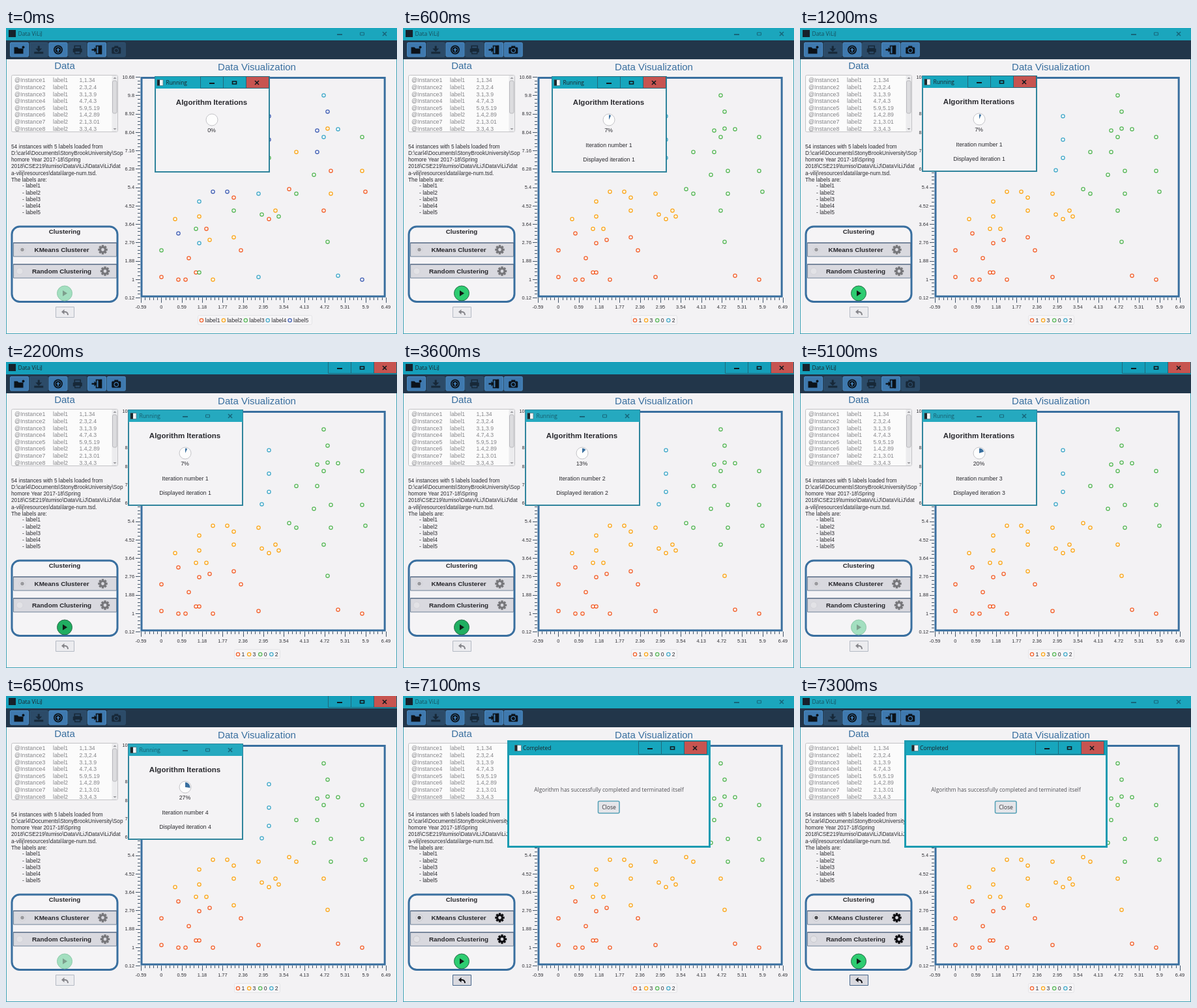
An HTML page with a canvas that plays this animation: 600 by 470 pixels, repeating every 7400 ms.

```html
<!DOCTYPE html>
<html lang="en">
<head>
<meta charset="utf-8">
<title>Data ViLiJ</title>
<style>
html, body { margin: 0; width: 100%; height: 100%; overflow: hidden; background: #f3f2f4; }
canvas { display: block; width: 600px; height: 470px; }
</style>
</head>
<body>
<canvas id="stage" width="600" height="470"></canvas>
<script>
const ctx = document.getElementById('stage').getContext('2d');
const LOOP = 7400, STEP = 100;
const ARIAL = '"Liberation Sans", Arial, sans-serif';
const UI = '"Open Sans", "Noto Sans", sans-serif';
const BLUE = '#396f9f', INK = '#1c2228', BODY = '#f3f2f4';
const COLORS = ['#f3622d', '#fba71b', '#57b757', '#41a9c9', '#4260b5'];
const CLUSTER_COLOR = { 1: COLORS[0], 3: COLORS[1], 0: COLORS[2], 2: COLORS[3] };

// Points of each label, as x, y pairs
const POINTS = [
  [238,382, 264,386, 275,386, 280,353, 291,375, 307,308, 360,341, 349,260, 403,293, 434,247, 487,280, 498,219, 551,251],
  [259,293, 296,289, 312,325, 317,386, 349,321, 413,280, 445,190, 493,154, 498,254, 546,219],
  [238,341, 291,308, 296,375, 349,280, 392,286, 418,289, 472,225, 445,254, 493,328, 546,167, 403,199],
  [296,266, 296,330, 387,254, 387,382, 487,167, 487,103, 509,155, 509,380, 392,218],
  [264,315, 317,251, 339,251, 477,157, 477,190, 493,128, 546,386, 403,135, 403,171]
];

const PERCENT = [0, 7, 13, 20, 27];
const EVENTS = [
  { at: 0, iter: 0, busy: true, focus: 'dialog', hover: false, done: false },
  { at: 600, iter: 1, busy: false },
  { at: 1900, focus: 'main', hover: true },
  { at: 2500, busy: true },
  { at: 3000, iter: 2, busy: false },
  { at: 4000, busy: true },
  { at: 4500, iter: 3, busy: false },
  { at: 4900, busy: true },
  { at: 5500, iter: 4, busy: false },
  { at: 6200, busy: true },
  { at: 7000, busy: false, focus: 'dialog', hover: false, done: true }
];

function stateAt(t) {
  return Object.assign({}, ...EVENTS.filter(e => e.at <= t));
}

function rect(x, y, w, h, fill, stroke, lw = 1, r = 0) {
  ctx.beginPath();
  ctx.roundRect(x, y, w, h, r);
  if (fill) { ctx.fillStyle = fill; ctx.fill(); }
  if (stroke) { ctx.strokeStyle = stroke; ctx.lineWidth = lw; ctx.stroke(); }
}

function circle(x, y, r, fill, stroke, lw = 1) {
  ctx.beginPath();
  ctx.arc(x, y, r, 0, Math.PI * 2);
  if (fill) { ctx.fillStyle = fill; ctx.fill(); }
  if (stroke) { ctx.strokeStyle = stroke; ctx.lineWidth = lw; ctx.stroke(); }
}

function poly(points, fill) {
  ctx.beginPath();
  for (let i = 0; i < points.length; i += 2) ctx.lineTo(points[i], points[i + 1]);
  ctx.fillStyle = fill;
  ctx.fill();
}

function line(x1, y1, x2, y2, color, lw = 1) {
  ctx.beginPath();
  ctx.moveTo(x1, y1);
  ctx.lineTo(x2, y2);
  ctx.strokeStyle = color;
  ctx.lineWidth = lw;
  ctx.stroke();
}

function text(str, x, y, size, color, { align = 'left', weight = 400, family = ARIAL } = {}) {
  ctx.font = `${weight} ${size}px ${family}`;
  ctx.textAlign = align;
  ctx.fillStyle = color;
  ctx.fillText(str, x, y);
}

// Minimise, maximise and close, each 35 wide, starting at x
function windowButtons(x, y, h, active) {
  const mid = y + h / 2;
  const glyph = active ? '#10191e' : '#17667a';
  if (active) {
    rect(x + 70, y, 35, h, '#c75450');
    for (let i = 0; i < 3; i++) rect(x + i * 35 + .5, y - .5, 35, h, null, '#21697b');
  }
  rect(x + 14, mid, 8, 2, glyph);
  rect(x + 49.5, mid - 2, 6, 4, null, glyph, active ? 1.6 : 1);
  line(x + 84, mid - 3, x + 90, mid + 3, glyph, 1.6);
  line(x + 90, mid - 3, x + 84, mid + 3, glyph, 1.6);
}

// Each icon is drawn around the middle of its button
const ICONS = [
  c => {
    poly([-8,-4, -3,-4, -1,-2, 6,-2, 6,6, -8,6], c);
    circle(6, -4, 2, c);
  },
  c => {
    rect(-1.5, -6, 3, 5, c);
    poly([-5,-2, 5,-2, 0,3], c);
    rect(-7, 3, 14, 3, c);
  },
  (c, bg) => {
    circle(0, 0, 7, c);
    circle(0, 0, 4.8, null, bg, .9);
    poly([-3,.5, 0,-3, 3,.5], bg);
    rect(-1, 0, 2, 3, bg);
  },
  (c, bg) => {
    rect(-4.5, -6, 9, 4, null, c, 1.6);
    rect(-7, -2, 14, 6, c, null, 1, 1);
    rect(-4, 2, 8, 4, bg, c, 1.4);
  },
  c => {
    rect(-1, -6, 8, 12, null, c, 1.6);
    poly([2,-6, 7,-7, 7,7, 2,6], c);
    rect(-8, -1.2, 5, 2.4, c);
    poly([-4,-4, 0,0, -4,4], c);
  },
  (c, bg) => {
    rect(-7, -4, 14, 10, c, null, 1, 1.5);
    rect(-3, -6, 6, 3, c);
    circle(0, 1, 3.2, null, bg, 1.2);
  }
];

function toolbar(s) {
  rect(0, 19, 600, 29, '#22364a');
  const enabled = [true, false, true, false, true, !s.busy];
  ICONS.forEach((icon, i) => {
    const cx = 20.5 + i * 29.75;
    const bg = enabled[i] ? '#3f79ae' : '#2c4b68';
    rect(cx - 14, 22.5, 28, 21.5, bg, enabled[i] ? '#4b8cc4' : '#2f5372', 1, 1.5);
    ctx.save();
    ctx.translate(cx, 33.5);
    icon(enabled[i] ? '#0b1219' : '#172838', bg);
    ctx.restore();
  });
}

function dataPanel() {
  text('Data', 90, 62.6, 15, BLUE, { align: 'center' });
  rect(8.5, 72.5, 163, 87, '#fbfbfb', '#c3c3c6', 1, 2);
  const values = ['1,1.34', '2.3,2.4', '3.1,3.9', '4.7,4.3', '5.9,5.19', '1.4,2.89', '2.1,3.01', '3.3,4.3'];
  values.forEach((v, i) => {
    const y = 83.3 + i * 10.62;
    text('@Instance' + (i + 1), 13, y, 8.9, '#858589');
    text(i < 5 ? 'label1' : 'label2', 72, y, 8.7, '#858589');
    text(v, 112.5, y, 8.7, '#858589');
  });
  rect(162.5, 73, 8.5, 86, '#ececee');
  rect(163.5, 81, 6.5, 50, '#dcdcdf', '#b9b9bd', 1, 2);
  poly([164.5,78, 169.5,78, 167,75.5], '#96969a');
  poly([164.5,154, 169.5,154, 167,156.5], '#96969a');

  const info = [
    '54 instances with 5 labels loaded from',
    'D:\\carl4\\Documents\\StonyBrookUniversity\\Sop',
    'homore Year 2017-18\\Spring',
    '2018\\CSE219\\tumiso\\DataViLiJ\\DataViLiJ\\dat',
    'a-vilij\\resources\\data\\large-num.tsd.',
    'The labels are:'
  ];
  info.forEach((str, i) => text(str, 8, 185 + i * 10.15, 8.3, '#2b2b30'));
  for (let i = 1; i <= 5; i++) text('- label' + i, 25, 235.3 + i * 10.15, 8.5, '#2b2b30');
}

function gear(x, y, color) {
  ctx.save();
  ctx.translate(x, y);
  for (let i = 0; i < 8; i++) {
    ctx.rotate(Math.PI / 4);
    rect(-1.7, -7.2, 3.4, 4, color);
  }
  circle(0, 0, 3.9, null, color, 3);
  ctx.restore();
}

function algorithmPanel(s) {
  rect(9, 305, 162, 115.5, '#f5f4f6', BLUE, 3, 12);
  const bold = { weight: 700, align: 'center' };
  text('Clustering', 90, 315.7, 9.8, '#26262b', bold);
  const gearColor = s.done ? '#101014' : '#77777b';
  [[330, 'KMeans Clusterer', 85.5, 148.5], [363, 'Random Clustering', 85.5, 152]].forEach(([y, name, x, gx], i) => {
    rect(11.5, y, 158, 21, '#d9d9df', '#6f8299');
    line(11, y, 170, y, '#465a79', 1);
    text(name, x, y + 13.8, 9.9, '#26262b', bold);
    gear(gx, y + 10.5, gearColor);
    if (i === 0) {
      circle(25, y + 10.5, 5, s.done ? '#e8e8ec' : '#dcdce1', s.done ? '#c2c2c8' : '#d2d2d8');
      circle(25, y + 10.5, 2.7, s.done ? '#4c4c50' : '#99999d');
    } else {
      circle(21, y + 10.5, 5, '#e2e2e6', s.done ? '#cacacf' : '#d5d5da');
    }
  });

  const fill = s.busy ? '#a3dfc0' : s.hover ? '#20ae61' : '#2ecc71';
  circle(90, 407.5, 11.5, fill, s.busy ? '#8fc9aa' : '#2a6d4a');
  poly([87,403, 94,407.5, 87,412], s.busy ? '#7d9f8d' : '#101914');

  rect(76.5, 428.5, 28, 16, s.done ? '#d9d9df' : '#ececef', s.done ? '#47668b' : '#b4bac4');
  const arrow = s.done ? '#101014' : '#85858a';
  poly([85,436, 89.5,432, 89.5,440], arrow);
  ctx.beginPath();
  ctx.moveTo(89, 436);
  ctx.quadraticCurveTo(95, 435.5, 95, 441);
  ctx.strokeStyle = arrow;
  ctx.lineWidth = 2;
  ctx.stroke();
}

function clusterOf(x, y, iter) {
  const lower = iter < 3 ? 293 + .075 * x : 285 + .105 * x;
  if (x < 410 && y < 225) return 2;
  if (y > lower) return 1;
  return x - y > [150, 175, 235, 235][iter - 1] ? 0 : 3;
}

function marker(x, y, color) {
  circle(x, y, 2.6, '#fbfafb', color, 1.3);
}

function chart(s) {
  text('Data Visualization', 385, 65.2, 15, BLUE, { align: 'center' });
  for (let i = 0; i <= 60; i++) {
    const major = i % 5 === 0;
    const x = Math.round(207 + i * 6.265) + .5;
    const y = Math.round(75 + i * 5.65) + .5;
    line(major ? 199 : 202, y, 206, y, '#44566a', 1);
    line(x, 414, x, major ? 422 : 418, '#44566a', 1);
    if (!major) continue;
    const k = i / 5;
    text(String(+(10.68 - .88 * k).toFixed(2)), 197, 77.9 + k * 28.25, 7.4, '#2e2e33', { align: 'right' });
    text(String(+(-.59 + .59 * k).toFixed(2)), 207 + k * 31.33, 431, 7.4, '#2e2e33', { align: 'center' });
  }
  rect(208, 76.5, 373.2, 335.7, BODY, BLUE, 3);

  POINTS.forEach((list, label) => {
    for (let i = 0; i < list.length; i += 2) {
      const [x, y] = [list[i], list[i + 1]];
      marker(x + .5, y + .4, s.iter ? CLUSTER_COLOR[clusterOf(x, y, s.iter)] : COLORS[label]);
    }
  });

  const names = s.iter ? ['1', '3', '0', '2'] : [1, 2, 3, 4, 5].map(n => 'label' + n);
  const left = s.iter ? 356 : 300, pitch = s.iter ? 17.1 : 33.9;
  rect(left - 5.5, 441.5, s.iter ? 70 : 175, 14, '#f6f5f7', '#e4e4e7', 1, 2);
  names.forEach((name, i) => {
    marker(left + i * pitch, 449, COLORS[i]);
    text(name, left + 5.5 + i * pitch, 452, 8.7, '#2e2e33');
  });
}

function dialogFrame(x, y, w, h, bar, title, active) {
  rect(x, y, w, h, '#2f849c');
  rect(x + 1, y + 1, w - 2, bar, active ? '#17a6bd' : '#25a9bf');
  rect(x + 2, y + bar, w - 4, h - bar - 2, '#f4f3f5');
  const mid = y + bar / 2;
  rect(x + 4, mid - 4, 9, 9, '#f2f6f7', '#597c86', .8);
  rect(x + 4, mid - 4, 4, 9, '#1d292e');
  text(title, x + 17.5, mid + 3.3, 8.4, active ? INK : '#175a6a', { family: UI });
}

function runningDialog(s, t) {
  const p = Math.min(1, Math.max(0, (t - 800) / 300));
  const ease = p * p * (3 - 2 * p);
  const x = Math.round(228 - 41 * ease), y = Math.round(74.4 - ease);
  const active = s.focus === 'dialog';
  dialogFrame(x, y, 177, 148, 19, 'Running', active);
  windowButtons(x + 70, y + 1, 18, active);

  const cx = x + 88, center = { align: 'center' };
  text('Algorithm Iterations', cx - .5, y + 44.2, 11.5, '#2a2a2f', { align: 'center', weight: 700 });
  circle(cx, y + 67, 9, '#fdfdfd', '#c4c4c8');
  const percent = PERCENT[s.iter];
  if (percent) {
    ctx.beginPath();
    ctx.moveTo(cx, y + 67);
    ctx.arc(cx, y + 67, 7.5, -Math.PI / 2, -Math.PI / 2 + percent / 100 * Math.PI * 2);
    ctx.fillStyle = BLUE;
    ctx.fill();
  }
  text(percent + '%', cx - .5, y + 85.5, 8.8, '#2a2a2f', center);
  if (s.iter) {
    text('Iteration number ' + s.iter, cx, y + 109, 8.8, '#2a2a2f', center);
    text('Displayed iteration ' + s.iter, cx, y + 131, 8.8, '#2a2a2f', center);
  }
}

function completedDialog() {
  dialogFrame(160, 68, 312, 165, 23, '', true);
  rect(161.5, 69.5, 309, 162, null, '#1b9bb1', 3);
  rect(163, 72, 20, 18, '#17a6bd');
  rect(171.5, 75.5, 10, 9, '#f2f6f7', '#597c86', .8);
  rect(171.5, 75.5, 4, 9, '#1d292e');
  text('Completed', 184, 83, 8.5, INK, { family: UI });
  windowButtons(361, 70, 20, true);
  const style = { family: UI, align: 'center' };
  text('Algorithm has successfully completed and terminated itself', 316, 147, 8.36, '#515156', style);
  rect(299.5, 161.5, 32.5, 18.5, '#e5e5e9', '#5aa3b8', 1.6, 2);
  text('Close', 316, 174, 8.6, '#333338', style);
}

function draw(t) {
  const s = stateAt(t);
  const active = s.focus === 'main';
  rect(0, 0, 600, 470, BODY);
  rect(0, 0, 600, 19, active ? '#159fba' : '#1ba6bd');
  rect(4, 3, 11, 11, '#17222c');
  text('Data ViLiJ', 18.5, 12.3, 8.6, active ? INK : '#164d5b', { family: UI });
  windowButtons(494, 0, 18, active);
  toolbar(s);
  dataPanel();
  algorithmPanel(s);
  chart(s);
  line(.5, 48, .5, 470, '#3fa3b6');
  line(599.5, 48, 599.5, 470, '#3fa3b6');
  line(0, 469.5, 600, 469.5, '#3fa3b6');
  if (s.done) completedDialog();
  else runningDialog(s, t);
}

const start = performance.now();
function tick() {
  const t = (performance.now() - start) % LOOP;
  draw(Math.floor(t / STEP) * STEP);
  requestAnimationFrame(tick);
}
tick();
</script>
</body>
</html>
```
